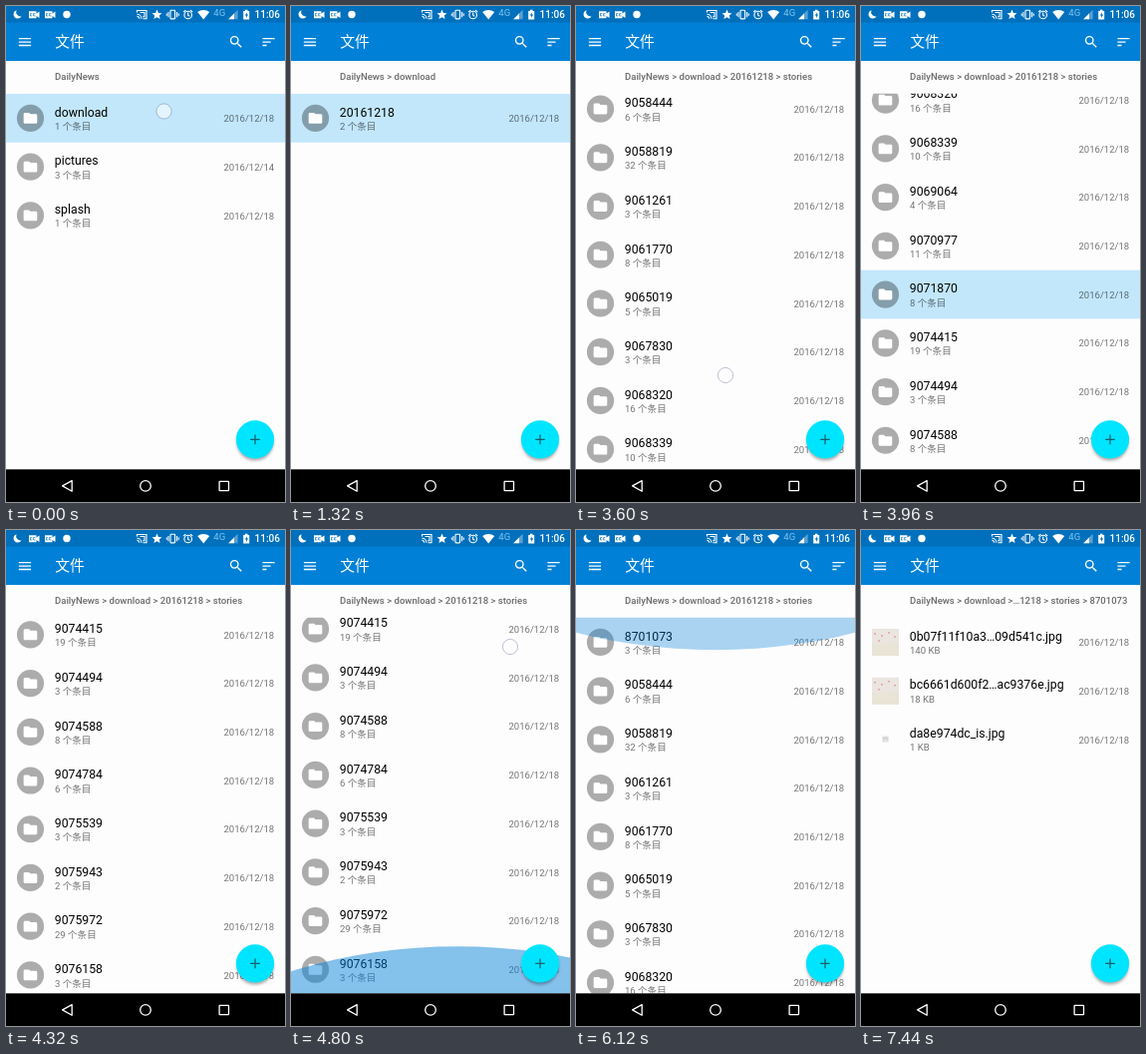
Animation of 280x497 px, one loop 8 s. Source, as an HTML page:

```html
<!DOCTYPE html>
<html lang="zh">
<head>
<meta charset="utf-8">
<title>文件</title>
<style>
html, body { margin: 0; width: 100%; height: 100%; overflow: hidden; background: #fefdfe; }
svg { display: block; width: 280px; height: 497px; }
text { font-family: Roboto, "Noto Sans CJK SC", "Noto Sans CJK", sans-serif; font-size: 9.54px; }
.name { font-size: 12.26px; fill: #000; }
.sub { fill: #000; fill-opacity: .54; }
.crumb { font-weight: 500; fill: #000; fill-opacity: .58; }
</style>
</head>
<body>
<svg viewBox="0 0 280 497" xmlns="http://www.w3.org/2000/svg">
  <defs>
    <clipPath id="view"><rect y="87.7" width="280" height="376.6"/></clipPath>
    <filter id="blur" x="-30%" y="-30%" width="160%" height="160%"><feGaussianBlur stdDeviation="1.8"/></filter>
    <path id="folder" d="M10 4H4c-1.1 0-2 .9-2 2v12c0 1.1.9 2 2 2h16c1.1 0 2-.9 2-2V8c0-1.1-.9-2-2-2h-8z"/>
  </defs>
  <rect width="280" height="497" fill="#fefdfe"/>

  <g clip-path="url(#view)">
    <g id="scroller">
      <rect id="press" width="280" height="48.73" fill="#c2e7fb"/>
      <g id="pages"></g>
    </g>
    <ellipse id="glow" rx="420" ry="303" fill="#0080d7"/>
  </g>
  <text id="crumb" class="crumb" x="49" y="74.4"></text>

  <!-- floating button -->
  <circle cx="250" cy="437" r="18.6" opacity=".33" filter="url(#blur)"/>
  <circle cx="250" cy="434.4" r="19.1" fill="#00e5ff"/>
  <path d="M245.2 434.4h9.6M250 429.6v9.6" stroke="#16606b" stroke-width="1.3"/>

  <!-- app bar -->
  <rect width="280" height="55" fill="#0080d7"/>
  <rect width="280" height="16.6" fill="#0070bd"/>
  <g fill="#fff">
    <text x="49.3" y="41.4" style="font-size:14.8px">文件</text>
    <g id="tools"></g>
  </g>

  <!-- status bar -->
  <g fill="#fff">
    <path d="M10.5 4.2a4.3 4.3 0 1 0 5 6.3a4.6 4.6 0 0 1-5-6.3z"/>
    <g id="cams"></g>
    <circle cx="61" cy="8.5" r="3.7"/>
    <path d="M151.5 3.6l1.4 3.3 3.6.3-2.7 2.4.8 3.5-3.1-1.9-3.1 1.9.8-3.5-2.7-2.4 3.6-.3z"/>
    <path d="M198.2 13.6l-6-7.6a9.6 9.6 0 0 1 12 0z"/>
    <path d="M232.6 3.8v9.4h-9.4z" opacity=".35"/>
    <path d="M229 7.4v5.8h-5.8z"/>
    <path d="M238.2 5h1.7V3.8h2.6V5h1.7v8.4h-6z"/>
    <path d="M241.8 6.2l-2 3.4h1.3v2.5l2-3.5h-1.3z" fill="#0070bd"/>
    <text x="208.3" y="9.8" fill="#7fc4ee">4G</text>
    <text x="249.6" y="12.2" font-weight="500" style="font-size:10px">11:06</text>
  </g>
  <g fill="none" stroke="#fff" stroke-width="1.1">
    <path d="M131.5 6.5v-2h9.5v8.2h-3.5M131.5 8.2a4.5 4.5 0 0 1 4.5 4.5M131.5 10.4a2.3 2.3 0 0 1 2.3 2.3"/>
    <path d="M134.5 6.5h4.5v4.2h-1.8"/>
    <rect x="165" y="4.3" width="4.6" height="8.6" rx=".6"/>
    <path d="M163 6v5.2M171.6 6v5.2M161.3 7.4v2.4M173.3 7.4v2.4"/>
    <circle cx="182.7" cy="9" r="3.8"/>
    <path d="M182.7 6.6v2.7l1.6 1M178.2 6l2.2-1.9M187.2 6L185 4.1"/>
  </g>

  <!-- navigation bar -->
  <rect y="464.3" width="280" height="32.7"/>
  <g fill="none" stroke="#fff" stroke-width="1.3">
    <path d="M66.2 475.6v10.6l-9.6-5.3z" stroke-linejoin="round"/>
    <circle cx="140" cy="480.9" r="5.3"/>
    <rect x="214.1" y="476.3" width="9.4" height="9.4" rx=".5"/>
  </g>
  <circle id="touch" r="7.6" fill="#fff" fill-opacity=".55" stroke="#55558f" stroke-opacity=".36"/>
</svg>
<script>
const LOOP = 8000, STEP = 120, TOP = 88, ROW = 48.73, END = 464.3, MAX = 598, RY = 303;
const $ = id => document.getElementById(id);

const DAY = '2016/12/18';
const items = n => n + ' 个条目';
const stories = `8701073:3 9058444:6 9058819:32 9061261:3 9061770:8 9065019:5 9067830:3 9068320:16
  9068339:10 9069064:4 9070977:11 9071870:8 9074415:19 9074494:3 9074588:8 9074784:6 9075539:3
  9075943:2 9075972:29 9076158:3`.split(/\s+/).map(s => s.split(':'));

const pages = [
  { from: 0, path: 'DailyNews',
    rows: [['download', items(1)], ['pictures', items(3), '2016/12/14'], ['splash', items(1)]] },
  { from: 240, path: 'DailyNews > download', rows: [['20161218', items(2)]] },
  { from: 1440, path: 'DailyNews > download > 20161218',
    rows: [['stories', items(20)], ['stories_top', items(5)]] },
  { from: 2880, path: 'DailyNews > download > 20161218 > stories',
    rows: stories.map(([id, n]) => [id, items(n)]) },
  { from: 7200, path: 'DailyNews > download >…1218 > stories > 8701073',
    rows: [['0b07f11f10a3…09d541c.jpg', '140 KB', DAY, 'photo'],
      ['bc6661d600f2…ac9376e.jpg', '18 KB', DAY, 'photo'],
      ['da8e974dc_is.jpg', '1 KB', DAY, 'tiny']] }
];

const icons = {
  folder: `<circle cx="24.5" cy="24.4" r="13.6" fill-opacity=".32"/>
    <use href="#folder" fill="#fff" transform="translate(16.3 16.2) scale(.681)"/>`,
  photo: `<rect x="11" y="11" width="27" height="27" fill="#ebe5e0"/>
    <path d="M11 26l9 2 8-3 10 2v11H11z" fill="#e8e4d6"/>
    <path d="M13 16h2M20 18h2M27 15h2M33 19h2M17 23h2" stroke="#dfa5a5" stroke-width="1.3"/>`,
  tiny: `<rect x="21.3" y="21" width="6.4" height="6.2" fill="#e4e4e4"/>
    <path d="M22.8 25.3v-2.4h3.4v2.4" fill="none" stroke="#c4c4c4" stroke-width=".8"/>`
};

const rowSvg = ([name, sub, day = DAY, icon = 'folder'], i) =>
  `<g transform="translate(0 ${TOP + i * ROW})">${icons[icon]}
    <text class="name" x="48.8" y="22.7">${name}</text>
    <text class="sub" x="49" y="36">${sub}</text>
    <text class="sub" x="269.2" y="28.1" text-anchor="end">${day}</text></g>`;

$('pages').innerHTML = pages.map(p => `<g>${p.rows.map(rowSvg).join('')}</g>`).join('');
const groups = [...$('pages').children];

const tool = (x, d) => `<path d="${d}" transform="translate(${x - 8.2} 27.9) scale(.681)"/>`;
$('tools').innerHTML =
  tool(19, 'M3 18h18v-2H3zM3 13h18v-2H3zM3 6v2h18V6z') +
  tool(231, 'M15.5 14h-.79l-.28-.27A6.47 6.47 0 0 0 16 9.5 6.5 6.5 0 1 0 9.5 16c1.61 0 3.09-.59 4.23-1.57l.27.28v.79l5 4.99L20.49 19zm-6 0a4.5 4.5 0 1 1 0-9 4.5 4.5 0 0 1 0 9z') +
  tool(263.6, 'M3 18h6v-2H3zM3 6v2h18V6zM3 13h12v-2H3z');
$('cams').innerHTML = [23, 39].map(x =>
  `<path d="M${x} 5.3h7.5v2.2l3-2v6.6l-3-2v2.2h-7.5z"/>
   <path d="M${x + 3.3} 7.6h-1.8v2.3h1.8M${x + 6.4} 7.6h-1.8v2.3h1.8" fill="none" stroke="#0070bd" stroke-width=".7"/>`).join('');

const part = (t, a, b) => Math.min(1, Math.max(0, (t - a) / (b - a)));
const smooth = u => u * u * (3 - 2 * u);
const bump = u => Math.sin(Math.PI * u);

const scrollAt = t => MAX * (smooth(part(t, 3415, 4375)) - smooth(part(t, 4920, 5878)));

const presses = [
  { from: 0, to: 2760, row: 0 },
  { from: 3960, to: 3960, row: 11 },
  { from: 6840, to: 7080, row: 0 }
];

// taps, and drags that move by dy
const touches = [
  { from: 0, to: 0, x: 158.5, y: 105.5 },
  { from: 1200, to: 1200, x: 150, y: 110 },
  { from: 2640, to: 2640, x: 141.5, y: 114.5 },
  { from: 3600, to: 3720, x: 150, y: 370, dy: -130 },
  { from: 4680, to: 4800, x: 220, y: 270, dy: -153 },
  { from: 5400, to: 5640, x: 139, y: 206, dy: 228.5 },
  { from: 6840, to: 6840, x: 146, y: 110 }
];

const set = (el, attrs) => { for (const k in attrs) el.setAttribute(k, attrs[k]); };
const active = (list, t) => list.find(e => t >= e.from && t <= e.to);

function drawGlow(t) {
  const low = 47 * bump(part(t, 4440, 5160)), high = 33 * bump(part(t, 5760, 6600));
  const atEnd = t < 5400;
  set($('glow'), {
    cx: atEnd ? 167 : 140,
    cy: atEnd ? END - low + RY : TOP + high - RY,
    opacity: (low + high) * .0102
  });
}

function draw(time) {
  const t = Math.floor(time / STEP) * STEP;
  const n = pages.filter(p => p.from <= t).length - 1;
  const fade = n && t === pages[n].from ? .5 : 1;
  groups.forEach((g, i) => set(g, { opacity: i === n ? fade : 0 }));
  $('crumb').textContent = pages[n].path;
  set($('scroller'), { transform: `translate(0 ${-scrollAt(t)})` });

  const press = active(presses, t);
  set($('press'), { y: TOP + (press ? press.row : 0) * ROW, opacity: press ? 1 : 0 });
  drawGlow(t);

  const hit = active(touches, t);
  set($('touch'), { visibility: hit ? 'visible' : 'hidden' });
  if (hit) {
    const { from, to, x, y, dy = 0 } = hit;
    set($('touch'), { cx: x, cy: dy ? y + dy * part(t, from, to) : y });
  }
}

const start = performance.now();
function tick() {
  draw((performance.now() - start) % LOOP);
  requestAnimationFrame(tick);
}
tick();
</script>
</body>
</html>
```
